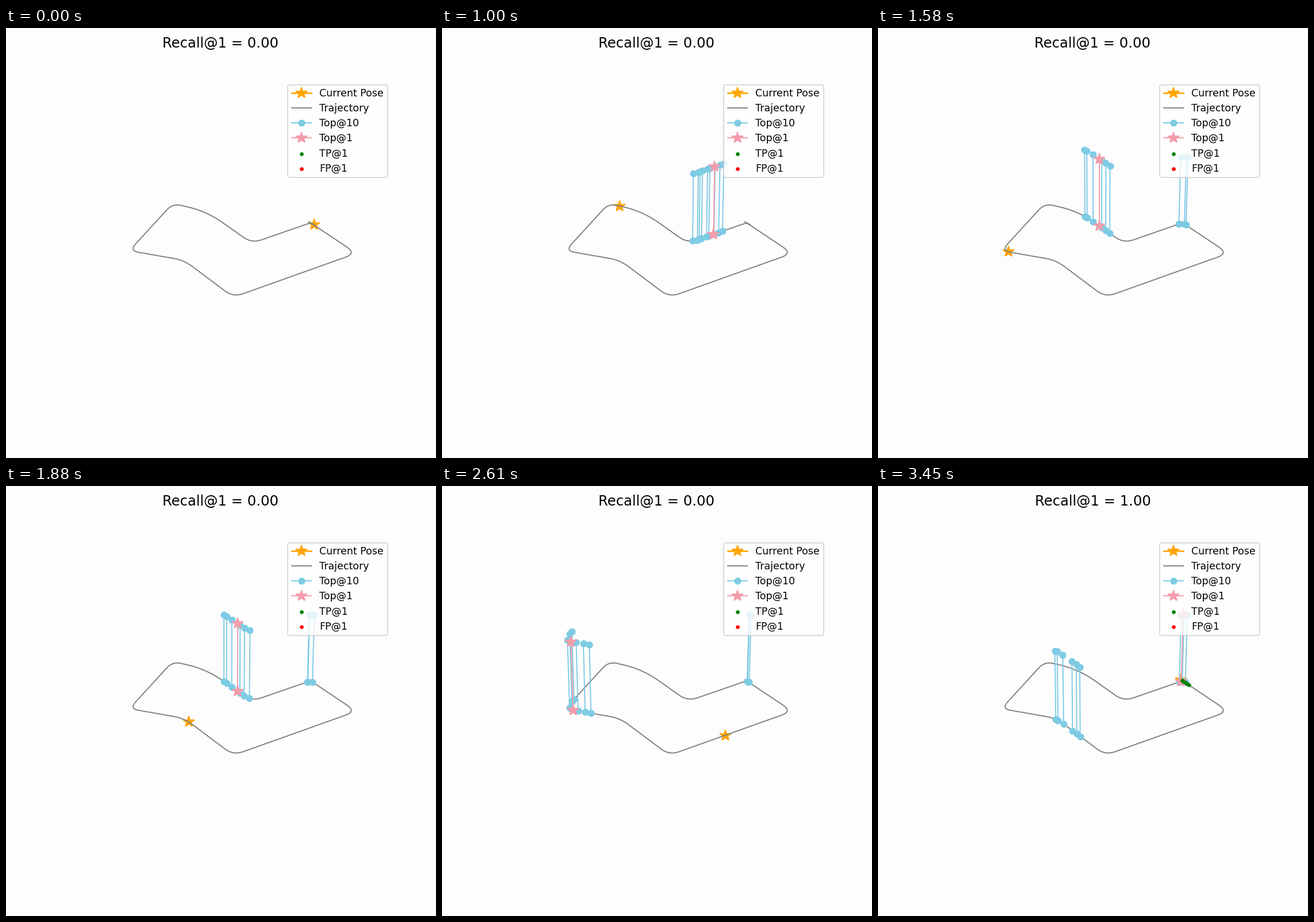
Recreate the animation shown at these times as a matplotlib script. Size 748 px wide and 748 px high, loop 3480 ms.

```python
import numpy as np
import matplotlib.pyplot as plt
from matplotlib.animation import FuncAnimation

SIZE = 748
DPI = 125
FRAMES = 116
BLUE, PINK = "#7ecbe4", "#f39cab"

START, END = (536, 342), (527, 337)
# x, y and rounding length of each bend
BENDS = [(529.5, 339, 4), (427.5, 374.4, 18), (349.3, 319, 34),
         (290, 305.2, 15), (214.7, 387.4, 16), (309.5, 403.9, 18),
         (395.4, 468.3, 18), (609.4, 392, 20)]


def rounded_path(start, bends, end):
    """Polyline whose corners are replaced by quadratic curves."""
    corners = np.array([start] + [b[:2] for b in bends] + [end], float)
    u = np.linspace(0, 1, 20)[:, None]
    parts = [corners[:1]]
    for before, c, after, bend in zip(corners, corners[1:], corners[2:], bends):
        a, b = (c + bend[2] * (p - c) / np.hypot(*(p - c))
                for p in (before, after))
        parts.append((1 - u)**2 * a + 2 * u * (1 - u) * c + u**2 * b)
    return np.vstack(parts + [corners[-1:]])


PATH = rounded_path(START, BENDS, END)
ARC = np.r_[0, np.cumsum(np.hypot(*np.diff(PATH, axis=0).T))]
LENGTH = ARC[-1]
GRID = np.linspace(0, LENGTH, 2000)


def point(s):
    return np.interp(s, ARC, PATH[:, 0]), np.interp(s, ARC, PATH[:, 1])


def arc_near(x, y):
    px, py = point(GRID)
    return GRID[np.hypot(px - x, py - y).argmin()]


def timeline(first, keys, last=()):
    """Steps and arc lengths from (step, x, y) keys between fixed ends."""
    rows = [first] + [(k, arc_near(x, y)) for k, x, y in keys] + list(last)
    return np.array(rows).T


POSE = timeline((0, 0), [(33, 309, 310), (52, 227, 390), (62, 318, 410),
                         (86, 493, 434), (104, 584, 376)], [(114, LENGTH)])
CLUSTER = timeline((19, 0), [(33, 462, 363), (52, 382, 342), (62, 401, 356),
                             (86, 229, 390), (104, 324, 416),
                             (114, 330, 420)])
MIN_GAP = 125    # recent poses are never retrieved
FAR = 300        # from here on some matches fall back to the start
BEST = 3
FIRST_HIT = arc_near(541, 346.5)


def matches(step, now, closed):
    rng = np.random.default_rng(step)
    early = 3 if now > FAR else 0
    s = np.interp(step, *CLUSTER) + np.linspace(-27, 27, 10 - early)
    s = np.r_[s + rng.uniform(-4, 4, s.size), rng.uniform(0, 14, early)]
    if closed:
        s[BEST] = LENGTH - now + 9
    s = np.clip(s, 0, now - MIN_GAP)
    return s[BEST:BEST + 1], np.delete(s, BEST)


def poles(s):
    x, y = point(s)
    top_x = x + (x - 382) * 0.023
    top_y = y - 116.3 - (y - 335) * 0.046
    gap = np.full_like(x, np.nan)
    return (np.column_stack([x, top_x, gap]).ravel(),
            np.column_stack([y, top_y, gap]).ravel())


fig = plt.figure(figsize=(SIZE / DPI, SIZE / DPI), dpi=DPI,
                 facecolor="#fefdfe")
ax = fig.add_axes([0, 0, 1, 1])
ax.set(xlim=(0, SIZE), ylim=(SIZE, 0))
ax.axis("off")

pose, = ax.plot([], [], "*-", color="orange", ms=12, lw=1.5, zorder=2,
                label="Current Pose")
ax.plot(*PATH.T, color="gray", lw=1.1, zorder=3, label="Trajectory")
top10, = ax.plot([], [], "o-", color=BLUE, ms=6, lw=1.1, zorder=4,
                 label="Top@10")
top1, = ax.plot([], [], "*-", color=PINK, ms=12, lw=1.1, zorder=5,
                label="Top@1")
hits = ax.scatter([], [], s=8, color="green", zorder=6, label="TP@1")
ax.scatter([], [], s=8, color="red", zorder=6, label="FP@1")
ax.legend(loc="upper left", bbox_to_anchor=(490, 98.5),
          bbox_transform=ax.transData, borderaxespad=0, borderpad=0.38,
          labelspacing=0.463, fontsize=10).set_zorder(8)
title = ax.text(373.5, 34, "", fontsize=14, ha="center", va="baseline")


def update(frame):
    step = frame - (frame >= 80)  # one pose is held for two ticks
    now = np.interp(step, *POSE)
    x, y = point(now)
    pose.set_data([x], [y])

    found = np.arange(FIRST_HIT, now - 2, 2.4)
    hits.set_offsets(np.column_stack(point(found)))
    title.set_text(f"Recall@1 = {float(found.size > 0):.2f}")

    if step >= CLUSTER[0, 0]:
        best, rest = matches(step, now, found.size > 0)
        top1.set_data(*poles(best))
        top10.set_data(*poles(rest))
    else:
        top1.set_data([], [])
        top10.set_data([], [])
    return pose, top10, top1, hits, title


anim = FuncAnimation(fig, update, frames=FRAMES, interval=30, repeat=True,
                     repeat_delay=0, blit=False)
plt.show()
```
